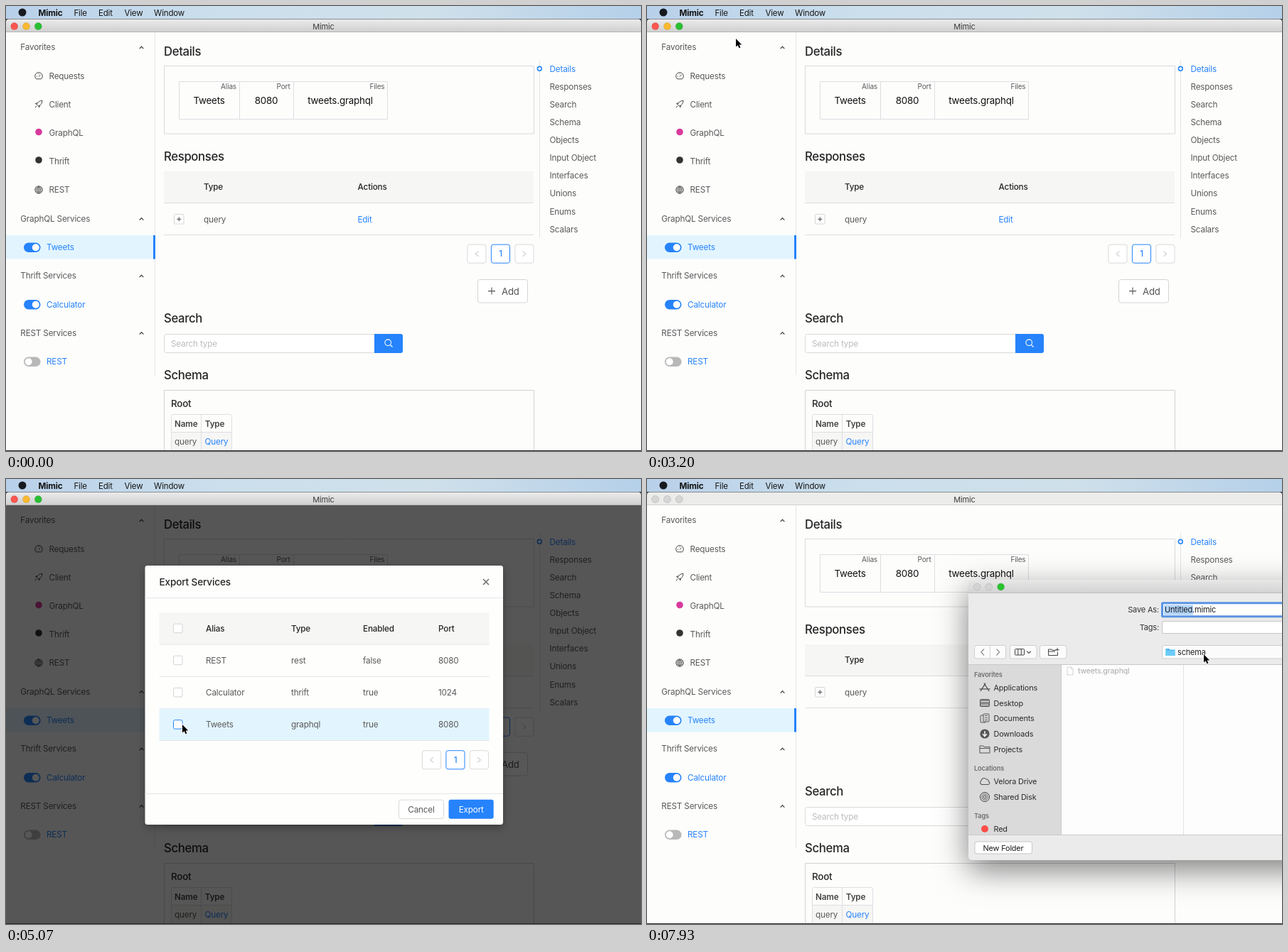
An HTML page with a canvas that plays this animation: 893x627 px, repeating every 8 s.

```html
<!DOCTYPE html>
<html lang="en">
<head>
<meta charset="utf-8">
<title>Export services</title>
<style>
html, body { margin: 0; width: 100%; height: 100%; overflow: hidden; background: #fdfdfc; }
canvas { display: block; width: 893px; height: 627px; }
</style>
</head>
<body>
<canvas id="stage" width="893" height="627"></canvas>
<script>
const W = 893, H = 627, TOP = 37, LOOP = 8000, FPS = 15;
const canvas = document.getElementById('stage');
const ctx = canvas.getContext('2d');
const ratio = window.devicePixelRatio || 1;
canvas.width = W * ratio;
canvas.height = H * ratio;

const BLUE = '#2683fb', GREY = '#595959', INK = '#262626', RULE = '#dedee2', PAPER = '#fdfdfc', HEAD = '#f6f6f5';
const BODY = 11.73, LARGE = 13.4, TITLE = 16.76;

const clamp = v => Math.max(0, Math.min(1, v));
const progress = (t, start, length) => clamp((t - start) / length);
const smooth = p => p * p * (3 - 2 * p);
const circOut = p => Math.sqrt(1 - (1 - p) * (1 - p));

// y is the middle of the capital letters
function text(s, x, y, color = GREY, size = BODY, weight = 400, align = 'left') {
  ctx.font = `${weight} ${size}px Inter, "DejaVu Sans", sans-serif`;
  ctx.letterSpacing = (size > 15 ? -0.022 : -0.015) * size + 'px';
  ctx.textAlign = align;
  ctx.fillStyle = color;
  ctx.fillText(s, x, y + size * 0.36);
}

function box(x, y, w, h, r, fill, stroke, width = 1) {
  ctx.beginPath();
  ctx.roundRect(x, y, w, h, r);
  if (fill) { ctx.fillStyle = fill; ctx.fill(); }
  if (stroke) { ctx.strokeStyle = stroke; ctx.lineWidth = width; ctx.stroke(); }
}

function dot(x, y, r, fill, stroke, width = 1) {
  ctx.beginPath();
  ctx.arc(x, y, r, 0, 7);
  if (fill) { ctx.fillStyle = fill; ctx.fill(); }
  if (stroke) { ctx.strokeStyle = stroke; ctx.lineWidth = width; ctx.stroke(); }
}

function path(d, x, y, stroke, width = 1, fill) {
  ctx.save();
  ctx.translate(x, y);
  const p = new Path2D(d);
  if (fill) { ctx.fillStyle = fill; ctx.fill(p); }
  if (stroke) { ctx.strokeStyle = stroke; ctx.lineWidth = width; ctx.stroke(p); }
  ctx.restore();
}

const rect = (x, y, w, h, fill) => { ctx.fillStyle = fill; ctx.fillRect(x, y, w, h); };
const hline = (x1, x2, y, color = RULE) => rect(x1, y, x2 - x1, 1, color);
const vline = (x, y1, y2, color = RULE) => rect(x, y1, 1, y2 - y1, color);

function gradient(x2, y1, y2, ...stops) {
  const g = ctx.createLinearGradient(0, y1, x2, y2);
  stops.forEach((c, i) => g.addColorStop(i / (stops.length - 1), c));
  return g;
}

function shadowed(blur, dy, alpha, draw) {
  ctx.save();
  ctx.shadowColor = `rgba(0,0,0,${alpha})`;
  ctx.shadowBlur = blur * ratio;
  ctx.shadowOffsetY = dy * ratio;
  draw();
  ctx.restore();
}

function pager(x, y) {
  [0, 33.5, 67].forEach((dx, i) => box(x + dx + .4, y + .4, 26.1, 26.1, 3, '#fff', i === 1 ? BLUE : '#d9d9d9'));
  path('M2.5 -3.5L-2 0L2.5 3.5', x + 13.5, y + 13.5, '#bdbdbd', 1);
  text('1', x + 47, y + 13.5, BLUE, BODY, 500, 'center');
  path('M-2.5 -3.5L2 0L-2.5 3.5', x + 80.5, y + 13.5, '#bdbdbd', 1);
}

function toggle(y, on) {
  box(25, y - 6.7, 23.5, 13.4, 6.7, on ? BLUE : '#b8b8b8');
  dot(on ? 41.8 : 31.7, y, 5, '#fff');
}

function menuBar(open) {
  rect(0, 0, W, 18, gradient(W, 0, 0, '#b8d0e9', '#cbdfec', '#cfe0ea', '#b5d0e9'));
  dot(23, 9, 5.5, '#16191d');
  if (open) rect(88, 0, 34.5, 18, '#1f68e6');
  text('Mimic', 45.5, 9.5, '#111', 11.7, 700);
  text('File', 95.5, 9.5, open ? '#fff' : '#161616', 11.5);
  text('Edit', 130, 9.5, '#161616', 11.5);
  text('View', 166.5, 9.5, '#161616', 11.5);
  text('Window', 208, 9.5, '#161616', 11.5);
}

function titleBar(active) {
  rect(0, 18, W, TOP - 18, '#2c2f33');
  box(0, 18.4, W, TOP - 18.4, [4, 4, 0, 0], active ? gradient(0, 18, TOP, '#ececec', '#cfcfcf') : '#ececea');
  hline(0, W, TOP - 1, active ? '#b4b4b4' : '#d2d2d2');
  const lights = active ? ['#fc5650', '#fdb92f', '#28c031'] : ['#d6d6d6', '#d6d6d6', '#d6d6d6'];
  lights.forEach((c, i) => dot(11.7 + i * 16.8, 28.6, 5, c, active ? 'rgba(0,0,0,.14)' : '#bebebe', .8));
  text('Mimic', 446.5, 29, '#3c3c3c', 11, 400, 'center');
}

function sidebar() {
  vline(209, TOP, 520, '#e6e6e6');
  rect(0, 323, 209, 33.5, '#e2f5ff');
  rect(207, 323, 3, 33.5, BLUE);
  [['Favorites', 58], ['GraphQL Services', 299.5], ['Thrift Services', 380], ['REST Services', 460.5]].forEach(([s, y]) => {
    text(s, 20.3, y);
    path('M-2.8 1.6L0 -1.4L2.8 1.6', 190.5, y + .5, '#404040', 1.3);
  });
  ['Requests', 'Client', 'GraphQL', 'Thrift', 'REST'].forEach((s, i) => text(s, 60.5, 98.3 + i * 40.2));
  path('M-3.6 4.3A5.3 5.3 0 1 1 3.6 4.3ZM0 1L2.5 -1.8M-3.2 .6H-2.2M0 -3.4V-2.4', 46, 98.5, '#4a4a4a');
  path('M5 -5C1 -5 -1.5 -2.5 -2.8 .3L-.3 2.8C2.5 1.5 5 -1 5 -5ZM-1.7 -1.8L-4.6 -.8L-2.8 .3M1.8 1.7L.8 4.6L-.3 2.8M-3 2.3L-5 5', 46, 138.3, '#4a4a4a');
  dot(46, 177.5, 4.8, '#d83a9c');
  dot(46, 217, 4.8, '#333');
  dot(46, 259, 5.2, null, '#4a4a4a');
  path('M-5 0H5M0 -5V5M-4.3 -2.7H4.3M-4.3 2.7H4.3M0 -5C-3.3 -2 -3.3 2 0 5C3.3 2 3.3 -2 0 -5', 46, 259, '#4a4a4a', .8);
  [['Tweets', 340, true], ['Calculator', 420.5, true], ['REST', 501, false]].forEach(([s, y, on]) => {
    toggle(y + .3, on);
    text(s, 57, y - .2, BLUE);
  });
}

function content() {
  [['Details', 63.8], ['Responses', 211.5], ['Search', 440.3], ['Schema', 519.8]].forEach(([s, y]) => text(s, 222, y, INK, TITLE, 500));

  box(222.5, 84.5, 520, 95.5, 0, null, '#dadadc');
  box(243.5, 106.5, 293, 53, 0, null, RULE);
  vline(328, 106, 160);
  vline(404, 106, 160);
  [['Alias', 'Tweets', 324, 285.5], ['Port', '8080', 399.5, 366], ['Files', 'tweets.graphql', 532.5, 470]].forEach(([label, value, right, mid]) => {
    text(label, right, 113, GREY, 10, 400, 'right');
    text(value, mid, 132.7, '#111', LARGE, 400, 'center');
  });

  rect(222, 233, 520, 44, HEAD);
  hline(222, 742, 277);
  hline(222, 742, 322);
  text('Type', 278, 255, INK, BODY, 500);
  text('Actions', 494.5, 255, INK, BODY, 500);
  box(236.5, 293.5, 13.5, 13.5, 1, '#fff', '#d6d6d6');
  path('M-3 0H3M0 -3V3', 243.3, 300.3, '#444');
  text('query', 278, 300.3);
  text('Edit', 494.5, 300.3, BLUE);
  pager(648.5, 335.7);

  box(663.5, 385.5, 70, 32.5, 3, '#fff', '#d4d4d4');
  path('M-5 0H5M0 -5V5', 683, 401.6, '#555', 1.1);
  text('Add', 697, 401.8, '#555', 13.2);

  box(222.5, 462.5, 300, 26, 3, '#fff', '#d9d9d9');
  text('Search type', 232, 475.5, '#bcbcbc');
  box(518, 462, 40, 27, [0, 3, 3, 0], BLUE);
  dot(537.2, 474.2, 4.3, null, '#fff', 1.1);
  path('M0 0L3.2 3.2', 540.3, 477.3, '#fff', 1.2);

  box(222.5, 541.5, 520, 100, 0, null, '#d2d2d4');
  text('Root', 232, 560.5, INK, LARGE, 500);
  rect(232, 601, 86, 25, HEAD);
  box(232.5, 575.5, 85, 60, 2, null, RULE);
  vline(274, 576, 626);
  hline(232, 318, 600);
  text('Name', 237, 588.7, '#444', BODY, 600);
  text('Type', 279.8, 588.7, '#444', BODY, 600);
  text('query', 237, 613.5);
  text('Query', 279.5, 613.5, BLUE);

  vline(750, 76, 326, '#e4e4e6');
  dot(750.3, 88.3, 2.9, '#fff', BLUE, 1.6);
  ['Details', 'Responses', 'Search', 'Schema', 'Objects', 'Input Object', 'Interfaces', 'Unions', 'Enums', 'Scalars']
    .forEach((s, i) => text(s, 764.5, 88.3 + i * 25.13, i ? GREY : BLUE));
}

function fileMenu(cursor) {
  shadowed(10, 4, .35, () => box(88, 18, 141.5, 81.5, [0, 0, 5, 5], '#e9e9ec'));
  const items = [['New Service', 29.5], ['Export Services...', 45.5], ['Import Services', 61.5], ['Speech', 87.5]];
  items.forEach(([s, y]) => {
    const hot = Math.abs(cursor.y - y) < 8;
    if (hot) rect(88, y - 8, 141.5, 16, '#2468e4');
    text(s, 106, y, hot ? '#fff' : '#202020', 11.5);
  });
  text('⌘N', 222, 29.5, '#202020', 11.5, 400, 'right');
  hline(88, 229.5, 75, '#cfcfd2');
  path('M0 -4.2L7.5 0L0 4.2Z', 211, 87.3, null, 0, '#202020');
}

function checkbox(y, state, hot) {
  box(235.5, y - 6.5, 12.5, 12.5, 2, state === 'on' ? BLUE : '#fff', state === 'on' || hot ? BLUE : '#d4d4d4');
  if (state === 'part') rect(237.7, y - 4.3, 8, 8, BLUE);
  if (state === 'on') path('M-3.4 -.2L-1 2.4L3.5 -2.6', 241.7, y - .1, '#fff', 1.7);
}

function modal(cursor, checked, pressed) {
  shadowed(12, 4, .3, () => box(195.5, 122, 503.5, 365, 3.4, '#fefefd'));
  text('Export Services', 215.5, 144.7, INK, 13.7, 500);
  path('M-4 -4L4 4M4 -4L-4 4', 675, 145, '#6a6a6a', 1.5);
  hline(195.5, 699, 167, '#e6e6e6');
  rect(215.5, 188.5, 464, 44.5, HEAD);
  const cols = [281, 401, 502, 608];
  const row = (cells, y, color, weight) => cells.forEach((s, i) => text(s, cols[i], y, color, BODY, weight));
  row(['Alias', 'Type', 'Enabled', 'Port'], 210.7, INK, 500);
  checkbox(210.7, checked ? 'part' : 'off');
  hline(215.5, 679.5, 232.5, '#e6e6e6');
  [['REST', 'rest', 'false', '8080'], ['Calculator', 'thrift', 'true', '1024'], ['Tweets', 'graphql', 'true', '8080']].forEach((cells, i) => {
    const top = 233 + i * 45.2, mid = top + 22.7;
    const over = cursor.x > 215 && cursor.x < 680 && cursor.y >= top && cursor.y < top + 45.2;
    const picked = checked && i === 2;
    if (over || picked) rect(215.5, top, 464, 45.2, over ? '#e2f5ff' : '#f7f7f7');
    hline(215.5, 679.5, Math.round(top + 45), '#e6e6e6');
    checkbox(mid, picked ? 'on' : 'off', over && cursor.x < 262);
    row(cells, mid, GREY, 400);
  });
  pager(585, 382.3);
  hline(195.5, 699, 443, '#e6e6e6');
  box(552.5, 452.2, 63, 26.3, 3, '#fff', '#d9d9d9');
  text('Cancel', 584, 466, GREY, BODY, 400, 'center');
  const over = cursor.x > 623 && cursor.x < 686 && cursor.y > 452 && cursor.y < 479;
  box(622.5, 451.7, 63.2, 27, 3, pressed ? '#1d5bd0' : over ? '#4c9dff' : BLUE);
  text('Export', 654.2, 466, '#fff', BODY, 400, 'center');
}

function panelIcons() {
  const ink = '#555';
  path('M-6 5L1 -6M6 5L-1 -6M-7.5 2H7.5', 475, 293.8, ink, 1.3);
  box(468.5, 310.5, 13, 10, 1, '#8b8b8b', ink);
  hline(469, 481, 313, '#dcdcdc');
  hline(470, 480, 318, '#dcdcdc');
  box(469, 333, 7.5, 10, 1, '#d8d8d8', ink);
  box(473, 331, 8, 11, 1, '#d8d8d8', ink);
  path('M2 -3H6M2 0H6M2 3H6', 473, 336.5, ink, .9);
  dot(475, 359, 6.6, '#555');
  path('M0 -4V3M-3 .3L0 3.6L3 .3', 475, 359, '#eee', 1.6);
  path('M-7 -5H-2L-1 -3.5H7V5H-7ZM-7 -1.5H7', 475, 381, ink);
  path('M-4.5 4.5A3.2 3.2 0 0 1 -5 -1A4 4 0 0 1 2 -3A3.2 3.2 0 0 1 5.5 .2A2.3 2.3 0 0 1 5 4.5Z', 475, 426, ink, 1.1);
  dot(475, 448, 6.6, '#c4c4c4', ink);
  dot(475, 448, 4, null, '#777', .8);
  dot(475, 448, 1.7, '#eee', ink);
  dot(475, 493, 5, '#fc4d48');
}

function savePanel() {
  shadowed(44, 14, .5, () => box(452, 142, 520, 395, 5, '#ebebeb'));
  box(452, 142, 520, 19, [5, 0, 0, 0], gradient(0, 142, 161, '#e7e7e7', '#d2d2d2'));
  hline(452, W, 160, '#bdbdbd');
  ['#d3d3d3', '#d3d3d3', '#2bc32f'].forEach((c, i) => dot(464 + i * 16.8, 152, 5, c, 'rgba(0,0,0,.12)', .8));

  text('Save As:', 720, 184.3, '#333', 11, 400, 'right');
  text('Tags:', 720, 209.3, '#333', 11, 400, 'right');
  box(724.5, 174.8, 200, 19, 1, '#fff', '#5b94e2', 3);
  rect(727, 177.5, 41, 14, '#b2d5fd');
  text('Untitled.mimic', 728, 184.5, '#161616', 11);
  box(724.5, 200.5, 200, 17, 0, '#fff', '#c6c6c6');

  box(460.5, 234.5, 44, 18.5, 3, '#fbfbfb', '#cfcfcf');
  vline(482, 235, 253, '#d4d4d4');
  path('M2 -4.5L-2.2 0L2 4.5', 472, 244, '#8a8a8a', 1.1);
  path('M-2 -4.5L2.2 0L-2 4.5', 493.5, 244, '#8a8a8a', 1.1);
  box(510.5, 234.5, 37.5, 18.5, 3, '#fbfbfb', '#cfcfcf');
  box(517.5, 239.5, 13, 8.5, 1, null, '#444');
  path('M4.5 0V8.5M9 0V8.5', 517.3, 239.5, '#444');
  path('M-2.7 -1.4L0 1.4L2.7 -1.4', 537, 244, '#444', 1.2);
  box(552.5, 234.5, 37.5, 18.5, 3, '#fbfbfb', '#cfcfcf');
  path('M-6.5 -4H-2L-1 -2.7H4M-6.5 -4V4.5H6.5V0M-6.5 -1H3M6 -6V-1M3.5 -3.5H8.5', 571, 244, '#444');
  box(724.5, 234.5, 200, 18.5, 3, '#fbfbfb', '#cfcfcf');
  path('M-6.5 -5H-1.5L-.5 -3.5H6.5V5H-6.5Z', 736, 244, null, 0, '#4dbcf2');
  rect(729.5, 242, 13, 7, '#6ccbf8');
  text('schema', 746, 244.3, '#222', 11);

  rect(452, 262, 131, 239, '#dadada');
  rect(583, 262, W - 583, 239, '#fdfdfd');
  hline(452, W, 261, '#c9c9c9');
  hline(452, W, 501, '#c9c9c9');
  vline(582, 262, 501, '#c9c9c9');
  vline(754, 262, 501, '#e2e2e2');
  path('M-4 -5.5H1.5L4 -3V5.5H-4ZM1.5 -5.5V-3H4', 595, 270.5, '#cfcfcf', .9, '#fff');
  text('tweets.graphql', 606, 270.5, '#a8a8a8', 10.6);

  [['Favorites', 275.3], ['Locations', 407.7], ['Tags', 475]].forEach(([s, y]) => text(s, 460, y, '#6e6e6e', 9.2, 600));
  [['Applications', 293.8], ['Desktop', 315.6], ['Documents', 337.4], ['Downloads', 359.2], ['Projects', 381],
   ['Velora Drive', 426.2], ['Shared Disk', 448], ['Red', 493.3]].forEach(([s, y]) => text(s, 487.5, y, '#2c2c2c', 10.9));
  panelIcons();

  box(461, 511, 80.5, 17, 3, '#fff', '#c6c6c6');
  text('New Folder', 501, 519.6, '#1c1c1c', 10.9, 400, 'center');
}

// time, x, y
const route = [[1270, 240, 650], [1700, 101, 12], [2130, 101, 12], [2600, 125, 46], [3200, 125, 46], [3400, 265, 86],
  [3800, 330, 170], [4730, 248, 346], [5530, 248, 346], [6600, 650, 460.5], [7270, 650, 460.5], [7900, 783, 247], [8000, 783, 247]];

function cursorAt(t) {
  if (t <= route[0][0]) return { x: -50, y: -50 };
  const i = route.findIndex(p => p[0] >= t);
  const [t0, x0, y0] = route[i - 1], [t1, x1, y1] = route[i];
  const p = smooth((t - t0) / (t1 - t0));
  return { x: x0 + (x1 - x0) * p, y: y0 + (y1 - y0) * p };
}

function pointer({ x, y }) {
  const arrow = 'M0 0V11.6L2.7 9.2L4.5 13.2L6.4 12.4L4.7 8.5H8.3Z';
  path(arrow, x, y, '#fff', 1.6);
  path(arrow, x, y, null, 0, '#000');
}

function draw(t) {
  const cursor = cursorAt(t);
  const menuOpen = t >= 1730 && t < 2930;
  const panelOpen = t >= 7460;
  ctx.setTransform(ratio, 0, 0, ratio, 0, 0);
  rect(0, 0, W, H, PAPER);
  sidebar();
  content();

  const opening = circOut(progress(t, 3242, 200));
  const closing = smooth(progress(t, 7190, 200));
  const shown = opening * (1 - closing);
  if (shown > 0) {
    rect(0, TOP, W, H - TOP, `rgba(0,0,0,${.66 * shown})`);
    const zoom = .2 + .8 * shown;
    ctx.save();
    ctx.globalAlpha = shown > .97 ? 1 : shown;
    ctx.translate(447.25, 304.6);
    ctx.scale(zoom, zoom);
    ctx.translate(-447.25, -304.6);
    modal(cursor, t >= 5330, t >= 6990 && t < 7130);
    ctx.restore();
  }

  rect(0, 626, W, 1, '#26282b');
  menuBar(menuOpen);
  titleBar(!panelOpen);
  if (menuOpen) fileMenu(cursor);
  if (panelOpen) savePanel();
  pointer(cursor);
}

const began = performance.now();
function tick() {
  const t = (performance.now() - began) % LOOP;
  draw(Math.floor(t * FPS / 1000 + .1) * 1000 / FPS % LOOP);
  requestAnimationFrame(tick);
}
tick();
</script>
</body>
</html>
```
